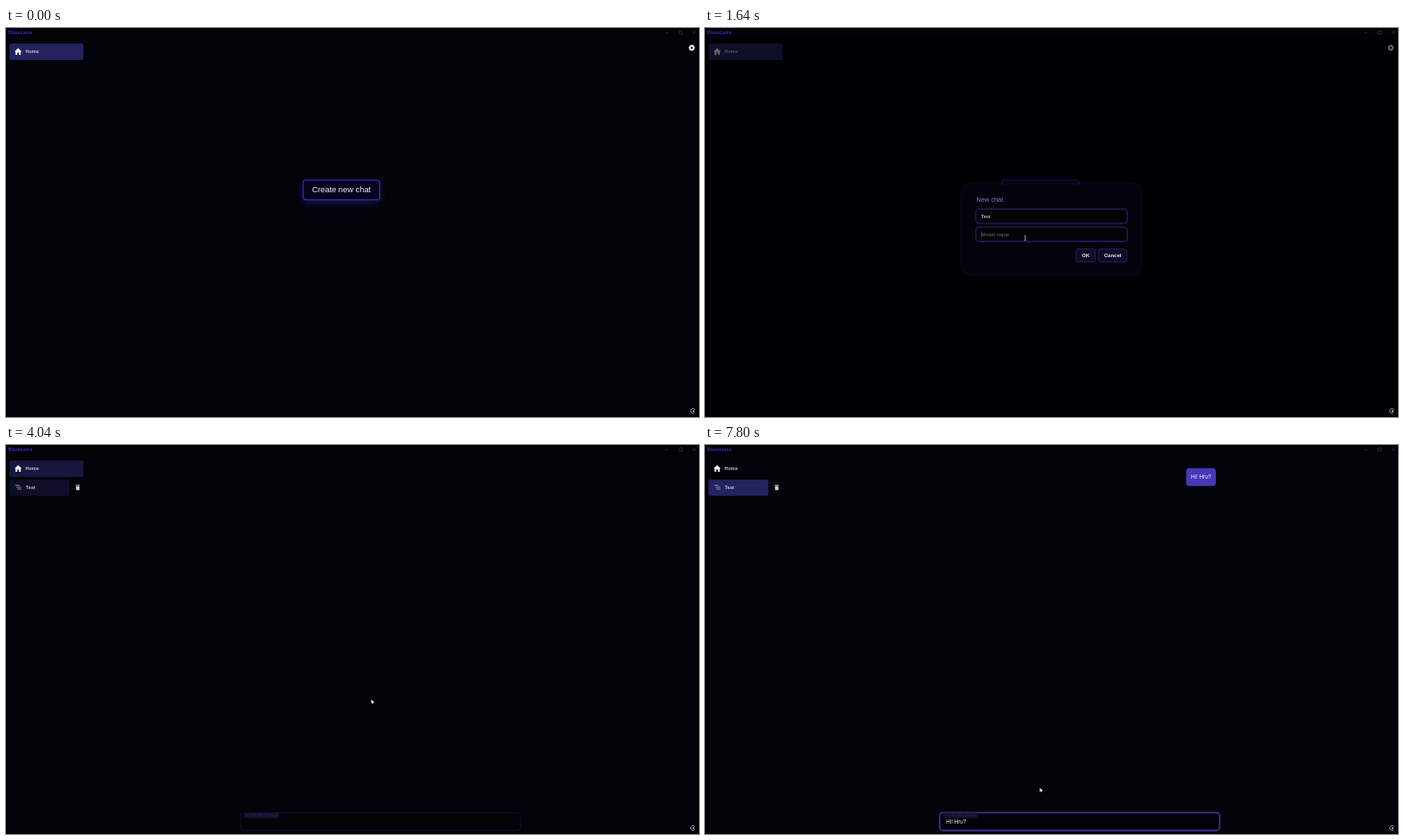
Write an HTML page with a canvas that moves like this. It is 800x450 px and loops after 8 s.

```html
<!DOCTYPE html>
<html lang="en">
<head>
<meta charset="utf-8">
<title>Chat demo</title>
<style>
  html, body { margin: 0; width: 100%; height: 100%; overflow: hidden; background: #03030a; }
  canvas { display: block; width: 800px; height: 450px; }
</style>
</head>
<body>
<canvas id="stage"></canvas>
<script>
const LOOP = 8000, BLINK = 640;
const canvas = document.getElementById('stage');
const dpr = window.devicePixelRatio || 1;
canvas.width = 800 * dpr;
canvas.height = 450 * dpr;
const g = canvas.getContext('2d');

const SANS = '"Liberation Sans", Arial, sans-serif';
const UI = 'Inter, sans-serif';
const BG = '#03030a', TAB = '#23235f', RING = '#40319f', WHITE = '#f0f0f4';

// The moments that drive the story
const OPEN = 560, TO_NAME = 960, TO_MODEL = 1540, SUBMIT = 3840, CHAT = 4000, FOCUS = 4280, SEND = 6400;

// Keys come in bursts: `gap` between bursts, 40 ms inside one
const typist = (text, start, gap, burst = 1) => ({
  text,
  keyTime: i => start + gap * Math.floor(i / burst) + 40 * (i % burst)
});
const chatName = typist('Test', 1200, 80);
const modelName = typist('qwen2.5:3b', 1960, 360, 2);
const message = typist('Hi! Hru?', 5140, 150);

// Pointer moves: each glides from the previous stop
const move = (from, to, x, y) => ({ from, to, x, y });
const MOVES = [
  move(360, 540, 368, 188.5),
  move(720, TO_NAME, 369, 219),
  move(1400, 1560, 369.5, 243),
  move(3360, 3440, 371.5, 243),
  move(3560, 3800, 438, 262),
  move(SUBMIT, 4520, 360.5, 415.5),
  move(4560, 4920, 386.5, 396.5)
];

const clamp = v => Math.max(0, Math.min(1, v));
const ease = u => u * u * (3 - 2 * u);
const fade = (t, from, to) => ease(clamp((t - from) / (to - from)));
const mix = (a, b, u) => a + (b - a) * u;

function withAlpha(a, draw) {
  if (a <= 0) return;
  g.save();
  g.globalAlpha *= a;
  draw();
  g.restore();
}

function glow(color, blur, dy, draw) {
  g.save();
  g.shadowColor = color;
  g.shadowBlur = blur * dpr;
  g.shadowOffsetY = dy * dpr;
  draw();
  g.restore();
}

function box(x, y, w, h, r, fill, stroke, line = 1) {
  g.beginPath();
  g.roundRect(x, y, w, h, r);
  if (fill) { g.fillStyle = fill; g.fill(); }
  if (stroke) { g.strokeStyle = stroke; g.lineWidth = line; g.stroke(); }
}

function disc(x, y, r, fill) {
  g.beginPath();
  g.arc(x, y, r, 0, 2 * Math.PI);
  g.fillStyle = fill;
  g.fill();
}

function label(str, x, y, size, color, { weight = 400, family = SANS, align = 'left' } = {}) {
  g.font = `${weight} ${size}px ${family}`;
  g.textAlign = align;
  g.fillStyle = color;
  g.fillText(str, x, y);
}

function line(x1, y1, x2, y2, color, width) {
  g.strokeStyle = color;
  g.lineWidth = width;
  g.beginPath();
  g.moveTo(x1, y1);
  g.lineTo(x2, y2);
  g.stroke();
}

function polygon(color, ...pts) {
  g.beginPath();
  pts.forEach(([x, y]) => g.lineTo(x, y));
  g.closePath();
  g.fillStyle = color;
  g.fill();
}

function titleBar() {
  g.fillStyle = '#020207';
  g.fillRect(0, 0, 800, 12);
  label('BlazeLama', 2.8, 7.2, 5.3, '#4224b4', { weight: 700 });
  const gray = '#3c3c44';
  line(761.3, 5.7, 764.3, 5.7, gray, 0.7);
  box(777, 3.4, 3.6, 3.6, 0, null, gray, 0.7);
  line(792.7, 3.4, 796.3, 7, gray, 0.7);
  line(796.3, 3.4, 792.7, 7, gray, 0.7);
}

function recorderIcon() {
  g.strokeStyle = '#c4c4ca';
  g.lineWidth = 0.8;
  g.beginPath();
  g.arc(793, 443, 2.6, 0.9, 5.9);
  g.stroke();
  disc(793.6, 443.2, 1, '#dcdce0');
}

function homeTab(active) {
  withAlpha(active, () => box(4, 18, 85.4, 19, 2, TAB));
  polygon(WHITE, [14, 23.2], [18.2, 27.2], [9.8, 27.2]);
  box(10.9, 26.6, 2.2, 4.4, 0, WHITE);
  box(14.9, 26.6, 2.2, 4.4, 0, WHITE);
  box(12.5, 26.6, 3, 1.8, 0, WHITE);
  label('Home', 22.6, 29.3, 5.4, WHITE, { weight: 500, family: UI });
}

function gear() {
  g.save();
  g.translate(791.7, 22.9);
  for (let i = 0; i < 8; i++) {
    box(-0.8, -3.6, 1.6, 2, 0, WHITE);
    g.rotate(Math.PI / 4);
  }
  disc(0, 0, 2.8, WHITE);
  disc(0, 0, 1.2, BG);
  g.restore();
}

function createButton() {
  glow('rgba(64,52,205,.35)', 10, 4, () => box(343, 176, 88.4, 22.8, 3.2, '#05041f'));
  box(343, 176, 88.4, 22.8, 3.2, null, '#3d34c4', 1.1);
  label('Create new chat', 387.2, 190.3, 9.35, WHITE, { align: 'center' });
}

const typed = (field, t) => [...field.text].filter((_, i) => field.keyTime(i) <= t).join('');

function caret(field, t, since, x, y, size) {
  const str = typed(field, t);
  const last = str ? field.keyTime(str.length - 1) : since;
  if ((t - last) % BLINK >= BLINK / 2) return;
  g.font = `400 ${size}px ${SANS}`;
  box(x + g.measureText(str).width + 0.2, y - size * 0.85, 0.5, size * 1.05, 0, str ? '#b0b0b8' : '#70707a');
}

function focusRing(x, y, w, h, focus) {
  withAlpha(focus, () => {
    box(x, y, w, h, 4, null, 'rgba(64,49,159,.35)', 2.4);
    box(x, y, w, h, 4, null, RING, mix(0.8, 1.3, focus));
  });
}

function field(f, hint, t, y, from, to) {
  const focus = fade(t, from, from + 200) * (1 - fade(t, to, to + 200));
  box(313, y, 174, 16, 3.5, '#030305');
  focusRing(312.7, y - 0.3, 174.8, 16.6, focus);
  const str = typed(f, t);
  label(str || hint, 318.7, y + 10, 5.9, str ? WHITE : '#6d6d72');
  if (t >= from && t < to) caret(f, t, from, 318.7, y + 10, 5.9);
}

function dialogButton(str, x, w) {
  box(x, 255.7, w, 14.9, 2.5, '#0e0c28', '#2a2668', 0.9);
  label(str, x + w / 2, 265.3, 6, WHITE, { weight: 700, align: 'center' });
}

function dialog(t) {
  glow('rgba(56,42,170,.35)', 5, 0, () => box(297, 181, 206, 103, 9, '#03030b'));
  label('New chat', 313.3, 200.9, 7.45, '#8479d6');
  field(chatName, 'Chat name', t, 209.7, TO_NAME, TO_MODEL);
  field(modelName, 'Model name', t, 230.6, TO_MODEL, SUBMIT);
  dialogButton('OK', 428.4, 22.2);
  dialogButton('Cancel', 454.3, 32.6);
}

function chatTab(active) {
  withAlpha(active, () => box(4, 40, 69.2, 18.8, 2, TAB));
  for (let i = 0; i < 3; i++) {
    const y = 46.6 + 2.2 * i;
    line(10.8 + 1.1 * i, y, Math.min(17.8, 15.6 + 2.2 * i), y, '#a9a9c6', 0.8);
  }
  label('Test', 22.8, 51.1, 5.3, WHITE, { weight: 500, family: UI });
  const bin = '#cfcfd4';
  box(80.8, 47.4, 4, 4.8, 0.8, bin);
  line(80.2, 46.6, 85.4, 46.6, bin, 0.8);
}

function messageBox(t) {
  box(271, 425.3, 323, 20.7, 4, '#020207', '#19153f', 0.8);
  focusRing(270.9, 425.3, 323.2, 20.7, fade(t, FOCUS - 80, FOCUS + 120));
  box(274.5, 425.6, 41, 6.2, 1.2, '#121026');
  label('YOUR MESSAGE', 276, 430.4, 4.7, '#2b2462');
  label(typed(message, t), 278.2, 437.9, 6.3, WHITE);
  if (t >= FOCUS) caret(message, t, FOCUS, 278.2, 437.9, 6.3);
}

function bubble() {
  box(555.4, 26.7, 34.4, 20.8, 3.8, '#4539b8');
  label('Hi! Hru?', 572.6, 39.3, 6.3, WHITE, { align: 'center' });
}

function pointer(t) {
  if (t < MOVES[0].from) return;
  let x = 373, y = 452;
  for (const m of MOVES) {
    const u = fade(t, m.from, m.to);
    x = mix(x, m.x, u);
    y = mix(y, m.y, u);
  }
  const inField = t > OPEN && t < SUBMIT && x < 487 && [217.7, 238.6].some(c => Math.abs(y - c) < 8);
  if (inField) {
    line(x, y - 2.6, x, y + 2.6, '#c6c6ca', 0.7);
    for (const end of [-2.6, 2.6]) line(x - 1, y + end, x + 1, y + end, '#c6c6ca', 0.7);
    return;
  }
  polygon(WHITE, [x, y], [x, y + 5], [x + 1.2, y + 4], [x + 2.4, y + 5.6], [x + 2.2, y + 3.7], [x + 3.6, y + 3.6]);
}

function render(t) {
  g.setTransform(dpr, 0, 0, dpr, 0, 0);
  g.fillStyle = BG;
  g.fillRect(0, 0, 800, 450);

  const inChat = t >= CHAT;
  const swap = fade(t, CHAT - 40, CHAT + 160);
  homeTab(1 - swap);
  if (inChat) {
    chatTab(swap);
    messageBox(t);
    withAlpha(fade(t, SEND, SEND + 120), bubble);
  } else {
    gear();
    createButton();
  }

  const modal = fade(t, OPEN, OPEN + 130) * (1 - fade(t, SUBMIT, SUBMIT + 160));
  withAlpha(modal, () => {
    g.fillStyle = 'rgba(0,0,0,.58)';
    g.fillRect(0, 0, 800, 450);
    dialog(t);
  });
  titleBar();
  recorderIcon();
  pointer(t);
}

const start = performance.now();
function tick() {
  render((performance.now() - start) % LOOP);
  requestAnimationFrame(tick);
}
tick();
</script>
</body>
</html>
```
